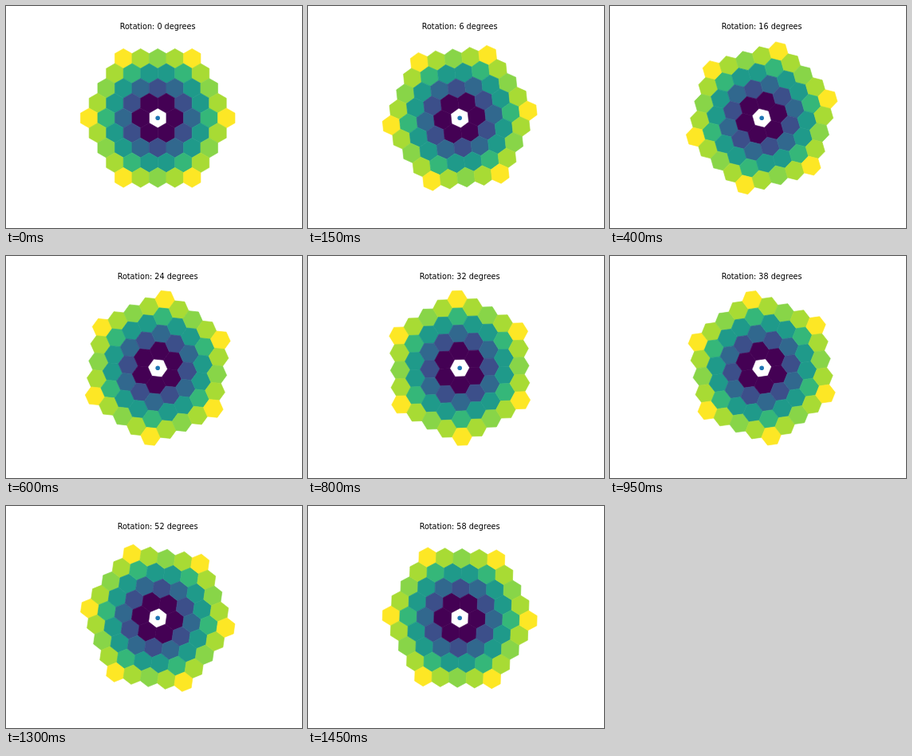
Write an HTML page that moves like this. It is 371 by 278 pixels and loops after 1.5 s.

```html
<!DOCTYPE html>
<html lang="en">
<head>
<meta charset="utf-8">
<title>Rotating hexagons</title>
<style>
  html, body { margin: 0; height: 100%; overflow: hidden; background: #fff; }
  svg { display: block; width: 100vw; height: 100vh; }
  text { font: 9.66px "DejaVu Sans", sans-serif; text-anchor: middle; }
  polygon { stroke-width: 0.6; stroke-linejoin: miter; }
</style>
</head>
<body>
<svg viewBox="0 0 371 278">
  <text id="title" x="190.1" y="29"></text>
  <g transform="translate(190.2 140.3)">
    <g id="grid"></g>
    <circle r="2.8" fill="#1f77b4"/>
  </g>
</svg>
<script>
const SPACING = 21.5;
const RINGS = 4;
const STEP_MS = 50;
const STEPS = 30;
const STEP_DEGREES = 2;

// Colour by squared distance from the centre, in grid units
const COLORS = {
  1: '#440154', 3: '#3c4f8a', 4: '#31688e', 7: '#1f9a8a',
  9: '#35b779', 12: '#88d548', 13: '#a8db34', 16: '#fde725'
};

const grid = document.getElementById('grid');
const title = document.getElementById('title');

function addHexagon(x, y, color) {
  const radius = SPACING / Math.sqrt(3);
  const points = Array.from({ length: 6 }, (_, i) => {
    const angle = (i + 0.5) * Math.PI / 3;
    return [x + radius * Math.cos(angle), y + radius * Math.sin(angle)];
  });
  const hexagon = document.createElementNS('http://www.w3.org/2000/svg', 'polygon');
  hexagon.setAttribute('points', points.join(' '));
  hexagon.setAttribute('fill', color);
  hexagon.setAttribute('stroke', color);
  grid.append(hexagon);
}

for (let r = -RINGS; r <= RINGS; r++) {
  for (let q = -RINGS; q <= RINGS; q++) {
    const color = COLORS[q * q + q * r + r * r];
    if (color && Math.abs(q + r) <= RINGS) {
      addHexagon(SPACING * (q + r / 2), SPACING * r * Math.sqrt(3) / 2, color);
    }
  }
}

function draw() {
  const degrees = Math.floor(performance.now() / STEP_MS) % STEPS * STEP_DEGREES;
  grid.setAttribute('transform', `rotate(${-degrees})`);
  title.textContent = `Rotation: ${degrees} degrees`;
  requestAnimationFrame(draw);
}
draw();
</script>
</body>
</html>
```
